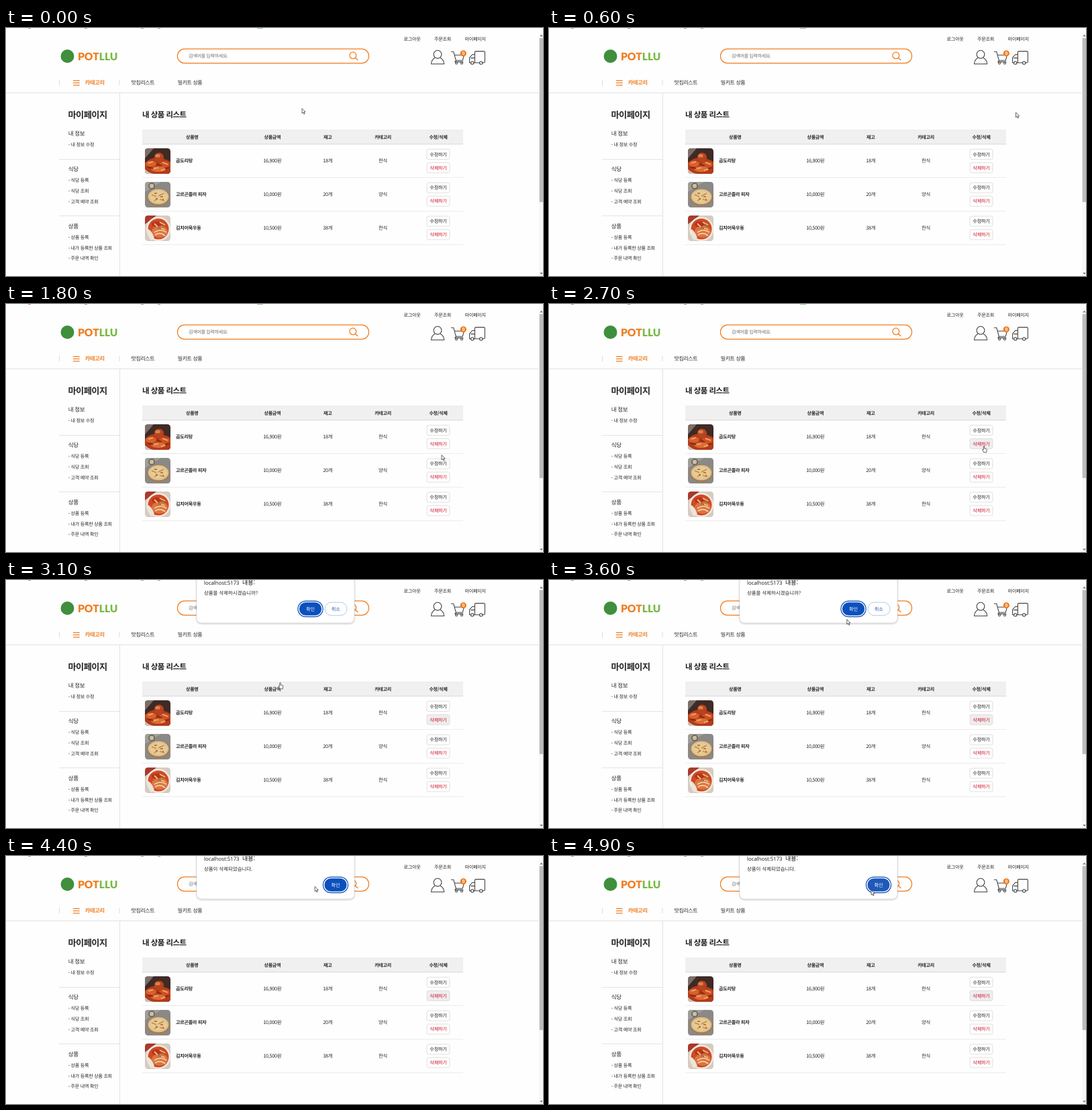
Write an HTML page that moves like this. It is 800 by 369 pixels and loops after 5000 ms.

```html
<!DOCTYPE html>
<html lang="ko">
<head>
<meta charset="utf-8">
<title>내 상품 리스트</title>
<style>
  html, body { margin: 0; width: 100%; height: 100%; overflow: hidden; background: #fefefe; }
  svg { display: block; width: 100vw; height: 100vh; }
  text { font-family: "Noto Sans CJK KR", "Noto Sans CJK", "Noto Sans", sans-serif; letter-spacing: -.04em; text-rendering: geometricPrecision; }
  .brand { font-family: Lato, "Open Sans", sans-serif; font-weight: 900; letter-spacing: 0; }
  .dialog text { letter-spacing: 0; }
  .dialog .host { font-family: "Open Sans", sans-serif; }
  .icon { fill: none; stroke: #444; stroke-width: 1.1; stroke-linecap: round; stroke-linejoin: round; }
</style>
</head>
<body>
<svg id="stage" viewBox="0 0 800 369" preserveAspectRatio="none">
  <defs>
    <clipPath id="photo"><rect width="38" height="38" rx="4.5"/></clipPath>
    <filter id="shadow" x="-10%" y="-20%" width="120%" height="150%">
      <feDropShadow dx="0" dy=".8" stdDeviation="1.3" flood-color="#000" flood-opacity=".28"/>
    </filter>
  </defs>
  <rect width="800" height="369" fill="#fefefe"/>
  <g id="page"></g>

  <g id="photos">
    <g transform="translate(207 179)" clip-path="url(#photo)">
      <rect width="38" height="38" fill="#3f2a26"/>
      <path d="M0 0H13L0 15Z" fill="#7b6f69"/>
      <path d="M0 38V22Q8 13 19 14T38 20V38Z" fill="#b23c1a"/>
      <path d="M0 38V31Q7 38 14 38Z" fill="#cfc4bb"/>
      <ellipse cx="9" cy="23" rx="8" ry="4.5" fill="#d9602b"/>
      <ellipse cx="29" cy="24" rx="8" ry="4.5" fill="#cd5224"/>
      <ellipse cx="20" cy="31" rx="11" ry="4" fill="#dc6d34"/>
      <circle cx="21" cy="13.5" r="7" fill="#b5441f"/>
      <ellipse cx="19" cy="11" rx="3.8" ry="2.6" fill="#e08048"/>
      <path d="M5 22l7-2M26 21l8 3M13 30l7-1M24 33l6-2" stroke="#f0b07a" stroke-width="1.4"/>
      <path d="M4 28l8 2M17 23l8 3M30 30l6-1" stroke="#7c2412" stroke-width="1.6"/>
    </g>
    <g transform="translate(207 229)" clip-path="url(#photo)">
      <rect width="38" height="38" fill="#8b8985"/>
      <path d="M0 0H24L0 15Z" fill="#a19e99"/>
      <circle cx="10" cy="6" r="5" fill="#6a655c"/>
      <circle cx="10" cy="6" r="3.2" fill="#cbbd9f"/>
      <ellipse cx="20" cy="23" rx="17" ry="13" fill="#a57c50"/>
      <ellipse cx="20" cy="22" rx="15.3" ry="11.2" fill="#dcc096"/>
      <ellipse cx="20" cy="22" rx="12.8" ry="9" fill="#e6cb92"/>
      <path d="M10 19l7 3M28 17l-8 4M14 28l5-3M22 26l7 2" stroke="#c58a4c" stroke-width="1.5"/>
      <path d="M14 17h4M23 22h4M16 25h3M26 26h2" stroke="#a95f38" stroke-width="1.4"/>
    </g>
    <g transform="translate(207 279)" clip-path="url(#photo)">
      <rect width="38" height="38" fill="#d5cbc0"/>
      <path d="M0 0H17L0 13Z" fill="#a83a2c"/>
      <circle cx="20" cy="20" r="18" fill="#f0eae1"/>
      <circle cx="20" cy="20" r="15.5" fill="#cf4a24"/>
      <ellipse cx="22" cy="24" rx="12" ry="9" fill="#dd7440"/>
      <path d="M3 20Q9 20 14 33L9 37Q3 30 3 20Z" fill="#ece5da"/>
      <path d="M14 25q9-6 18 0M15 29q8-5 15 1" fill="none" stroke="#f2d3a8" stroke-width="1.7"/>
      <ellipse cx="17" cy="13" rx="7" ry="4" fill="#b8331c"/>
      <path d="M22 10l8 4M14 12l5 5M24 19l6 2" stroke="#f0c08a" stroke-width="1.8"/>
      <path d="M19 18l5 1M26 13l2 3" stroke="#66803c" stroke-width="1.7"/>
    </g>
  </g>

  <g class="icon">
    <circle cx="643" cy="39.2" r="5.9"/>
    <path d="M638.8 44.6C635.5 46.5 633.7 49.5 633.5 53.5H652.7C652.5 49.5 650.6 46.5 647.2 44.6"/>
    <path d="M663.4 35.2H666.7L670.4 48.3H680.2L682.4 40.3H668.1M670.4 48.3L668.8 50.4H680.8"/>
    <circle cx="671" cy="52.2" r="1.5"/><circle cx="679" cy="52.2" r="1.5"/>
    <path d="M692.2 51.7H690.6V44.2L694.7 39.5H698.4V51.7H697M698.4 39.5V36.2Q698.4 34.6 700 34.6H711.8Q713.4 34.6 713.4 36.2V50.2Q713.4 51.7 711.8 51.7H710.3M705.2 51.7H698.4M692.7 44.6H698"/>
    <circle cx="694.7" cy="51.9" r="2.1"/><circle cx="707.7" cy="51.9" r="2.1"/>
  </g>
  <circle cx="681.3" cy="37.8" r="4.6" fill="#ef7d20"/>
  <text x="681.2" y="40.2" font-size="6.5" font-weight="700" text-anchor="middle" fill="#fff">0</text>

  <g id="dialog" class="dialog">
    <path d="M284-6H519V56Q519 64 511 64H292Q284 64 284 56Z" fill="#fff" stroke="#cdcdcd" stroke-width=".6" filter="url(#shadow)"/>
    <text class="host" x="295" y="7" font-size="7.8" fill="#111">localhost:5173</text>
    <text x="352" y="7" font-size="9" fill="#111">내용:</text>
    <text id="message" x="295" y="22.2" font-size="7.4" fill="#222"></text>
    <g id="cancel">
      <rect x="475" y="33.2" width="33" height="19.6" rx="9.8" fill="#fff" stroke="#a9c4e8" stroke-width=".9"/>
      <text x="491.3" y="45.7" font-size="7.2" text-anchor="middle" fill="#2c5ba8">취소</text>
    </g>
    <g id="confirm">
      <rect x="-18.6" y="-11.6" width="37.2" height="23.2" rx="11.6" fill="#fff" stroke="#0b4cb4" stroke-width="1.2"/>
      <rect id="fill" x="-16.6" y="-9.8" width="33.2" height="19.6" rx="9.8"/>
      <text y="2.7" font-size="7.2" text-anchor="middle" fill="#fff">확인</text>
    </g>
  </g>

  <g id="cursor" stroke="#333" stroke-linejoin="round">
    <path id="arrow" d="M0 0V7.2L1.7 5.7L2.9 8.4L4.1 7.9L2.9 5.2H5.1Z" fill="#fff" stroke-width=".75"/>
    <path id="hand" d="M-.8 .8Q0-.6 .8 .8V4L3.6 4.6Q4.5 4.9 4.4 5.8L3.8 8.2V9.7H-.6V8.7L-2.6 6Q-2.5 4.8-.8 6Z" fill="#fff" stroke-width=".75"/>
  </g>
</svg>
<script>
const $ = id => document.getElementById(id);
const ORANGE = '#ef7d20', GREEN = '#78b943', INK = '#262626';
let markup = '';

const text = (s, x, y, size, { fill = INK, weight = 400, anchor = 'start', cls = '' } = {}) =>
  markup += `<text x="${x}" y="${y}" font-size="${size}" fill="${fill}" font-weight="${weight}" text-anchor="${anchor}" class="${cls}">${s}</text>`;
const rect = (x, y, w, h, fill, extra = '') =>
  markup += `<rect x="${x}" y="${y}" width="${w}" height="${h}" fill="${fill}" ${extra}/>`;
const path = (d, stroke, width) =>
  markup += `<path d="${d}" fill="none" stroke="${stroke}" stroke-width="${width}" stroke-linecap="round"/>`;

function header() {
  [[33, 4, '#e58a80'], [117, 4, '#7cb99a'], [201, 4, '#a79bc8'], [226, 4, '#c79a90'], [374, 9, '#8fce8a']]
    .forEach(([x, w, c]) => rect(x, 0, w, 1, c));
  markup += `<circle cx="91.5" cy="42" r="10" fill="#3f8f3c"/>`;
  text('POT', 107, 48, 15.5, { fill: ORANGE, cls: 'brand' });
  text('LLU', 138.8, 48, 15.5, { fill: GREEN, cls: 'brand' });
  rect(255.4, 31.2, 285.2, 21.1, '#fff', `rx="10.55" stroke="${ORANGE}" stroke-width="1.2"`);
  text('검색어를 입력하세요.', 272, 44.4, 7, { fill: '#6c6c6c' });
  markup += `<circle cx="516.8" cy="40.8" r="4.9" fill="none" stroke="${ORANGE}" stroke-width="1.3"/>`;
  path('M520.4 44.4L523.8 47.6', ORANGE, 1.4);
  text('로그아웃', 592.5, 18.5, 7.1, { weight: 500 });
  text('주문조회', 638, 18.5, 7.1);
  text('마이페이지', 683.5, 18.5, 7.1);
  rect(79, 77, 1, 8.5, '#ddd');
  rect(168.5, 77, 1, 8.5, '#ddd');
  [78.3, 81.7, 85.1].forEach(y => path(`M100.3 ${y}H109.3`, ORANGE, 1.2));
  text('카테고리', 117.8, 84.3, 8.2, { fill: ORANGE, weight: 700 });
  text('맛집리스트', 186.5, 84.3, 7.9, { weight: 500 });
  text('밀키트 상품', 255.7, 84.3, 7.9, { weight: 500 });
  rect(0, 96, 794, 1, '#e2e2e2');
}

function sidebar() {
  rect(169, 97, 1, 272, '#e2e2e2');
  text('마이페이지', 92.5, 133.7, 13.2, { weight: 700 });
  const groups = [
    [160.4, '내 정보', ['내 정보 수정']],
    [213.4, '식당', ['식당 등록', '식당 조회', '고객 예약 조회']],
    [298, '상품', ['상품 등록', '내가 등록한 상품 조회', '주문 내역 확인']]
  ];
  groups.forEach(([y, title, items], i) => {
    text(title, 92.7, y, 8.5, { weight: 500 });
    items.forEach((s, k) => text('- ' + s, 92.7, y + 16 + k * 15.6, 7.1));
    if (i) rect(79, Math.round(y - 18.8), 90, 1, '#e4e4e4');
  });
}

function button(label, y, fill, id = '') {
  rect(627.1, y, 33.8, 15, '#fff', `rx="2.2" stroke="#dcdcdc" stroke-width=".9" id="${id}"`);
  text(label, 644, y + 10.2, 7.2, { fill, weight: 500, anchor: 'middle' });
}

function table() {
  const cols = [277.3, 396.8, 479.2, 561.5, 644];
  text('내 상품 리스트', 203, 132.6, 11.4, { fill: '#1c1c1c', weight: 600 });
  rect(203, 152, 478, 21, '#f0f0f0');
  rect(203, 151.5, 478, .6, '#e2e2e2');
  rect(203, 172.5, 478, .8, '#cfcfcf');
  ['상품명', '상품금액', '재고', '카테고리', '수정/삭제'].forEach((s, i) =>
    text(s, cols[i], 164.5, 7, { weight: 700, anchor: 'middle' }));
  [['곱도리탕', '16,900원', '18개', '한식'],
   ['고르곤졸라 피자', '10,000원', '20개', '양식'],
   ['김치어묵우동', '10,500원', '38개', '한식']].forEach(([name, ...cells], i) => {
    const y = 173 + i * 49.8;
    text(name, 253, y + 27.4, 7.1, { weight: 600 });
    cells.forEach((s, k) => text(s, cols[k + 1], y + 27.4, 7.3, { weight: 500, anchor: 'middle' }));
    button('수정하기', y + 7.4, '#1c1c1c');
    button('삭제하기', y + 27.3, '#d00f28', 'del' + i);
    rect(203, Math.round(y + 49.2), 478, 1, '#ececec');
  });
}

function scrollbar() {
  rect(794, 7, 6, 362, '#f7f7f7');
  rect(794.7, 15, 5.3, 244, '#bcbcbc');
  markup += '<path d="M795.3 12.5L797.5 9.8L799.7 12.5ZM795.3 364L797.5 366.7L799.7 364Z" fill="#777"/>';
}

header(); sidebar(); table(); scrollbar();
$('page').innerHTML = markup;

// Pointer stops: time, x, y
const stops = [
  [0, 441, 119.7], [600, 695.5, 125.7], [900, 752, 150], [1200, 714, 196], [1500, 669, 220],
  [1800, 649, 224.7], [2100, 648, 211], [2800, 648, 211], [3100, 408.5, 152.3],
  [3500, 438, 72], [3800, 451, 43], [4100, 451, 43], [4900, 480, 50.7], [5000, 480, 50.7]
];
const LOOP = 5000, STEP = 100;
const ASK = 2900, ANSWER = 4200, DONE = 4400;

// Smooth curve that comes to rest wherever the direction turns
function slope(i, k) {
  const a = stops[i - 1], b = stops[i], c = stops[i + 1];
  if (!a || !c) return 0;
  const l = (b[k] - a[k]) / (b[0] - a[0]), r = (c[k] - b[k]) / (c[0] - b[0]);
  return l * r <= 0 ? 0 : 2 * l * r / (l + r);
}
function along(t, k) {
  const i = stops.findIndex((s, n) => n < stops.length - 1 && t < stops[n + 1][0]);
  const a = stops[i], b = stops[i + 1], h = b[0] - a[0], u = (t - a[0]) / h, v = 1 - u;
  return a[k] * v * v * (1 + 2 * u) + b[k] * u * u * (3 - 2 * u)
    + h * u * v * (slope(i, k) * v - slope(i + 1, k) * u);
}

const inside = (x, y, l, t, r, b) => x >= l && x <= r && y >= t && y <= b;
const show = (id, on) => $(id).style.display = on ? '' : 'none';

function draw(time) {
  const t = Math.floor(time % LOOP / STEP) * STEP;
  const x = along(t, 1), y = along(t, 2);
  const asking = t >= ASK && t < ANSWER, done = t >= DONE;
  const overDelete = inside(x, y, 627, 200, 661, 216);
  const hand = overDelete || (asking && y > 64);
  const cx = done ? 491 : 453.5;

  $('del0').setAttribute('fill', overDelete || t >= ASK ? '#eee' : '#fff');
  show('dialog', asking || done);
  show('cancel', asking);
  $('message').textContent = done ? '상품이 삭제되었습니다.' : '상품을 삭제하시겠습니까?';
  $('confirm').setAttribute('transform', `translate(${cx} 43)`);
  $('fill').setAttribute('fill', inside(x, y, cx - 17, 33, cx + 17, 53) ? '#1f59b9' : '#0b50bd');
  show('arrow', !hand);
  show('hand', hand);
  $('cursor').setAttribute('transform', `translate(${x} ${y})`);
}

const start = performance.now();
function tick() {
  draw(performance.now() - start);
  requestAnimationFrame(tick);
}
tick();
</script>
</body>
</html>
```
